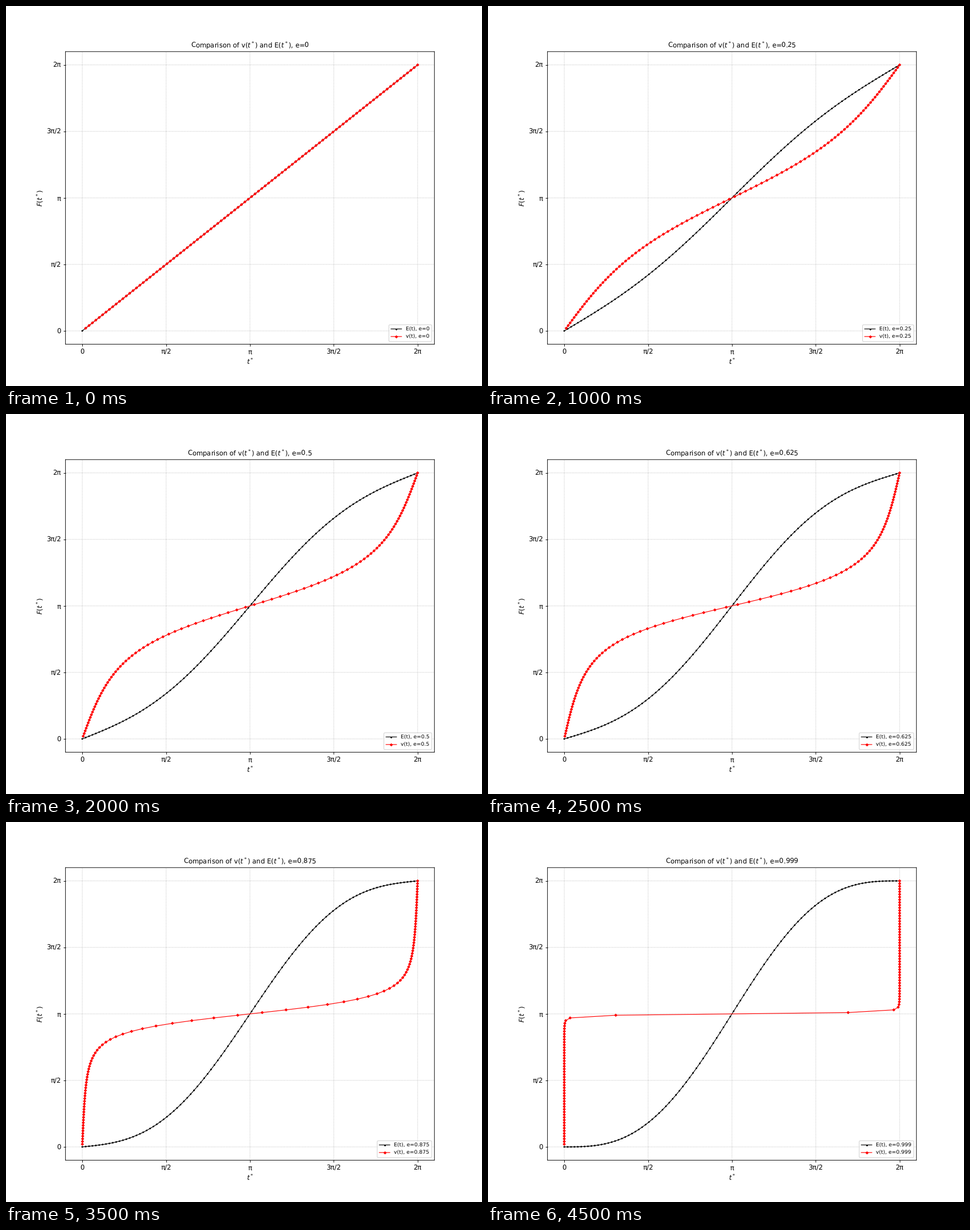
A matplotlib script that plays this animation: 837x669 px, repeating every 5000 ms.

```python
import numpy as np
import matplotlib.pyplot as plt
from matplotlib.animation import FuncAnimation

DPI = 83.7
STEP_MS = 500
TAU = 2 * np.pi
ECCENTRICITIES = [k / 8 for k in range(8)] + [0.99, 0.999]

plt.rcParams.update({
    "font.family": "DejaVu Sans",
    "text.hinting": "no_hinting",
    "path.snap": False,
})

angle = np.linspace(0, TAU, 100)
true_anomaly = angle[1:]


def mean_anomaly(ecc_anomaly, e):
    return ecc_anomaly - e * np.sin(ecc_anomaly)


def to_eccentric(v, e):
    return 2 * np.arctan2(np.sqrt(1 - e) * np.sin(v / 2),
                          np.sqrt(1 + e) * np.cos(v / 2))


fig, ax = plt.subplots(figsize=(837 / DPI, 669 / DPI), dpi=DPI)
fig.subplots_adjust(left=0.125, right=0.9, bottom=0.11, top=0.88)


def make_curve(color, marker, size, count, z):
    """A line plus a scatter, whose markers keep sub-pixel positions."""
    line, = ax.plot([], [], color=color, lw=1, zorder=z)
    zeros = np.zeros(count)
    dots = ax.scatter(zeros, zeros, s=np.full(count, size ** 2), c=color,
                      marker=marker, linewidths=1, zorder=z + 0.1)
    return line, dots


def move_curve(curve, x, y):
    line, dots = curve
    line.set_data(x, y)
    dots.set_offsets(np.column_stack([x, y]))


ecc_curve = make_curve("black", ".", 3, len(angle), 2)
true_curve = make_curve("red", "D", 2.5, len(true_anomaly), 2.2)

ticks = np.linspace(0, TAU, 5)
names = ["0", "π/2", "π", "3π/2", "2π"]
ax.set_xticks(ticks, names)
ax.set_yticks(ticks, names)
pad = 0.05 * TAU
ax.set_xlim(-pad, TAU + pad)
ax.set_ylim(-pad, TAU + pad)
ax.set_xlabel("$t^*$", fontsize=10, labelpad=2)
ax.set_ylabel("$F(t^*)$", fontsize=10, labelpad=2)
ax.grid(linestyle=":")
ax.set_axisbelow(True)


def draw(i):
    e = ECCENTRICITIES[i]
    move_curve(ecc_curve, angle, mean_anomaly(angle, e))
    move_curve(true_curve, mean_anomaly(to_eccentric(true_anomaly, e), e),
               true_anomaly)
    ax.set_title(f"Comparison of v($t^*$) and E($t^*$), e={e:g}", fontsize=10)
    ax.legend([ecc_curve, true_curve], [f"E(t), e={e:g}", f"v(t), e={e:g}"],
              loc="lower right", fontsize=8, scatteryoffsets=[0.5])
    return ecc_curve + true_curve


anim = FuncAnimation(fig, draw, frames=len(ECCENTRICITIES), init_func=lambda: draw(0),
                     interval=STEP_MS, repeat=True, repeat_delay=0, blit=False)
plt.show()
```
